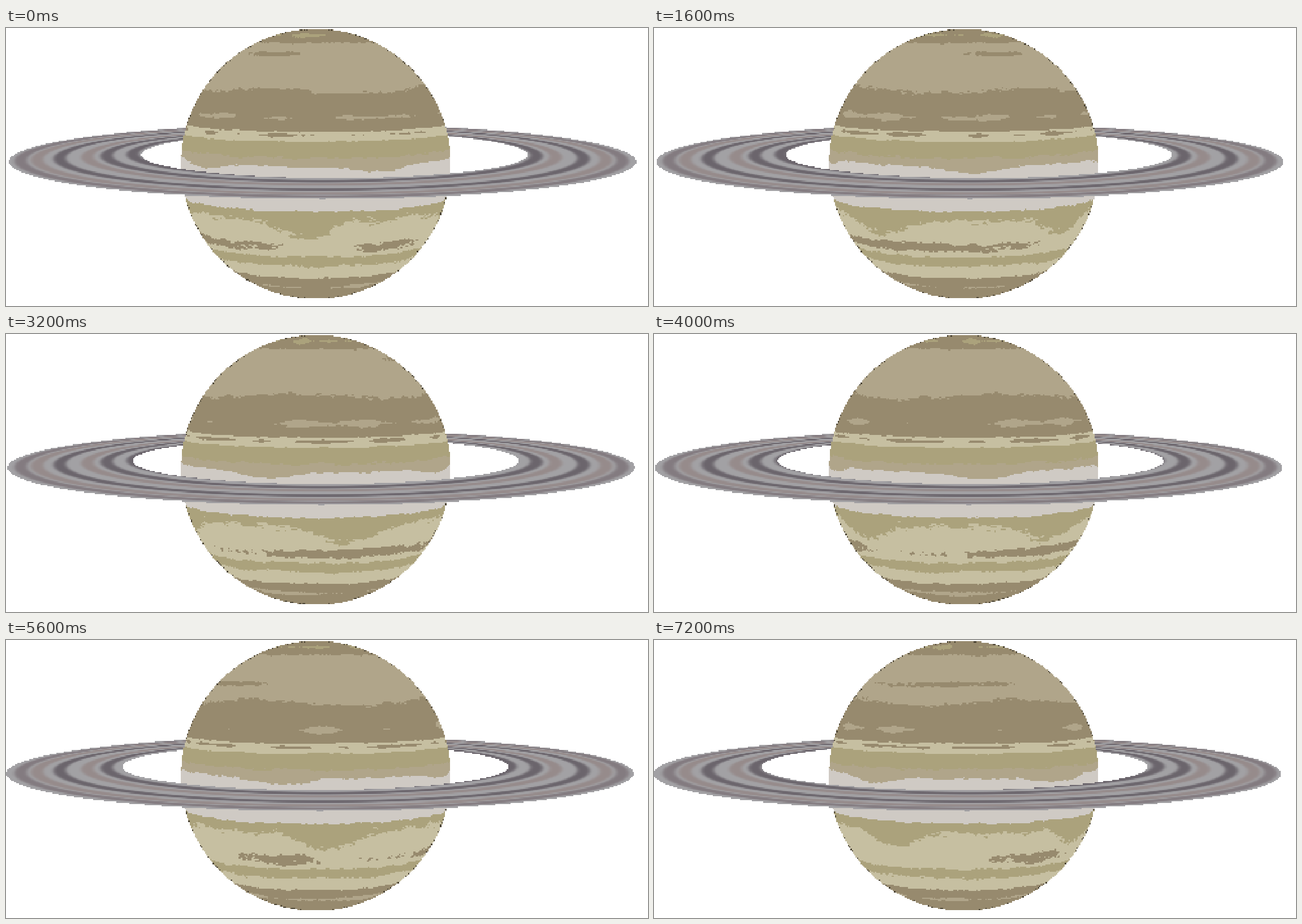
Write an HTML page with a canvas that moves like this. It is 1135x493 px and loops after 8 s.

```html
<!DOCTYPE html>
<html lang="en">
<head>
<meta charset="utf-8">
<title>Ringed planet</title>
<style>
  html, body { margin: 0; width: 100%; height: 100%; overflow: hidden; background: #fff; }
  canvas { display: block; width: 1135px; height: 493px; image-rendering: pixelated; }
</style>
</head>
<body>
<canvas id="stage" width="500" height="217"></canvas>
<script>
const STEP_MS = 800, STEPS = 10, TURN = 30;
const W = 500, H = 217, SX = 1135 / W, SY = 493 / H;
const ctx = document.getElementById('stage').getContext('2d');

const rgb = hex => [1, 3, 5].map(i => parseInt(hex.slice(i, i + 2), 16));
const TAN = rgb('#b0a58a'), BROWN = rgb('#978a6e'), KHAKI = rgb('#aba27c');
const CREAM = rgb('#c6bfa1'), PALE = rgb('#cfcac4'), LIMB = rgb('#4b4434');
const GREY = rgb('#a2a1a4'), DARK = rgb('#6b656c'), ROSE = rgb('#968b8b'), DUSK = rgb('#837b80');

const PLANET = { x: 547.8, y: 241, rx: 238.5, ry: 239.5 };
const RING = { x: 559.6, y: 237, rx: 554.5, ry: 66.3 };
const GROOVES = [
  { colour: DARK, radii: [334, 380, 463] },
  { colour: ROSE, radii: [414, 503] },
  { colour: DUSK, radii: [532] }
];

// Storms that drift across the disc, placed by latitude and longitude
const STORMS = [
  { lat: 391, lon: 44, long: 24, tall: 8 },
  { lat: 391, lon: -94, long: 78, tall: 8 },
  { lat: 391, lon: -231, long: 26, tall: 9 },
  { lat: 46, lon: -34, long: 24, tall: 4 },
  { lat: 79, lon: -278, long: 46, tall: 5 }
];

function hash(x, y) {
  let h = Math.imul(x, 374761393) + Math.imul(y, 668265263);
  h = Math.imul(h ^ (h >>> 13), 1274126177);
  return ((h ^ (h >>> 16)) >>> 0) / 4294967296;
}

function noise(x, y) {
  const i = Math.floor(x), j = Math.floor(y);
  const ease = t => t * t * (3 - 2 * t);
  const mix = (a, b, t) => a + (b - a) * t;
  const u = ease(x - i), v = ease(y - j);
  return mix(
    mix(hash(i, j), hash(i + 1, j), u),
    mix(hash(i, j + 1), hash(i + 1, j + 1), u), v);
}

// Repeating hump from 0 to 1, highest at the given longitude
const hump = (lon, peak, period) =>
  Math.max(0, Math.cos((lon - peak) * 2 * Math.PI / period)) ** 1.5;

const inStorm = (lat, lon, rough) => STORMS.some(s =>
  ((lat - s.lat) / s.tall) ** 2 + ((lon - s.lon) / s.long) ** 2 + rough * 1.8 < 0.85);

// Broken streak along a latitude; its thickness follows the noise
const inWisp = (lat, lon, rough, at, tall, span) =>
  Math.abs(lat - at) < tall * (2.4 * noise(lon / span, at) - 0.9 + rough);

function cloud(lat, lon) {
  const broad = noise(lon / 9, lat / 7) - 0.5;
  const fine = noise(lon / 1.8, lat / 2.3 + 50) - 0.5;
  const rough = broad * 0.8 + fine * 0.7;

  if (lat < 27 + rough * 4) return inWisp(lat, lon, rough, 13, 4, 20) ? KHAKI : BROWN;
  if (lat < 112 + 4 * Math.sin(lon / 17) + rough * 11) return inStorm(lat, lon, rough) ? BROWN : TAN;
  if (lat < 184 + rough * 3) return inWisp(lat, lon, rough, 160, 5, 16) ? TAN : BROWN;
  if (lat < 202 + rough * 3) return inWisp(lat, lon, rough, 191, 3, 9) ? BROWN : CREAM;
  if (lat < 231 + rough * 8) return KHAKI;
  if (lat < 247 + 11 * hump(lon, -56, 85) + rough * 5) return TAN;
  if (lat < 326 + rough * 4) return PALE;
  if (lat < 344 + 27 * hump(lon, -5, 100) + rough * 16) return KHAKI;
  if (lat < 407 + rough * 5) return inStorm(lat, lon, rough) ? BROWN : CREAM;
  if (lat < 423 + rough * 7) return KHAKI;
  if (lat < 444 + rough * 4) return CREAM;
  return inWisp(lat, lon, rough, 461, 3, 25) ? TAN : BROWN;
}

function planetColour(x, y, turn, speck) {
  const dx = x - PLANET.x, dy = (y - PLANET.y) / PLANET.ry;
  const half = PLANET.rx * Math.sqrt(Math.max(0, 1 - dy * dy));
  if (Math.abs(dx) > half) return null;
  const edge = 1 - Math.hypot(dx / PLANET.rx, dy);
  if (edge < 0.006 && Math.abs(dy) > 0.25 && speck < 0.25) return LIMB;
  const theta = Math.asin(dx / half);
  const bend = 25 * Math.exp(-(((y - 310) / 170) ** 2));
  return cloud(y + bend * (1 - Math.cos(theta)), theta * 180 / Math.PI - turn);
}

// Radius of the ring circle through a point; the circles' centres drift down as they grow
function ringRadius(x, y) {
  const k = 0.119, m = 0.0584, X = x - 558, Y = y - 204.3;
  const q = k * k - m * m;
  return (-m * Y + Math.sqrt(m * m * Y * Y + q * (Y * Y + k * k * X * X))) / q;
}

function ringColour(x, y, step) {
  const ringX = RING.x - 0.65 * step;
  const holeX = 580.5 - 2.5 * step - 0.33 * step * step;
  if (Math.hypot((x - ringX) / RING.rx, (y - RING.y) / RING.ry) > 1) return null;
  if (Math.hypot((x - holeX) / 341.5, (y - 225) / 41) < 1) return null;
  const r = ringRadius(x, y);
  let colour = GREY;
  for (const groove of GROOVES) {
    for (const at of groove.radii) {
      const depth = Math.exp(-(((r - at) / 12) ** 4));
      colour = colour.map((c, n) => c + (groove.colour[n] - c) * depth);
    }
  }
  return colour;
}

function render(step) {
  const image = ctx.createImageData(W, H);
  for (let j = 0; j < H; j++) {
    for (let i = 0; i < W; i++) {
      const x = (i + 0.5) * SX, y = (j + 0.5) * SY;
      const speck = hash(i + step * 31, j + 700);
      const ring = ringColour(x, y, step);
      const inFront = ring && y > 240;
      const colour = inFront ? ring : planetColour(x, y, step * TURN, speck) || ring;
      if (colour) image.data.set([...colour, 255], (j * W + i) * 4);
    }
  }
  return image;
}

const views = [];
let shown = -1;

function tick() {
  const step = Math.floor(performance.now() / STEP_MS) % STEPS;
  if (step !== shown) {
    views[step] = views[step] || render(step);
    ctx.putImageData(views[step], 0, 0);
    shown = step;
  }
  requestAnimationFrame(tick);
}
tick();
</script>
</body>
</html>
```
